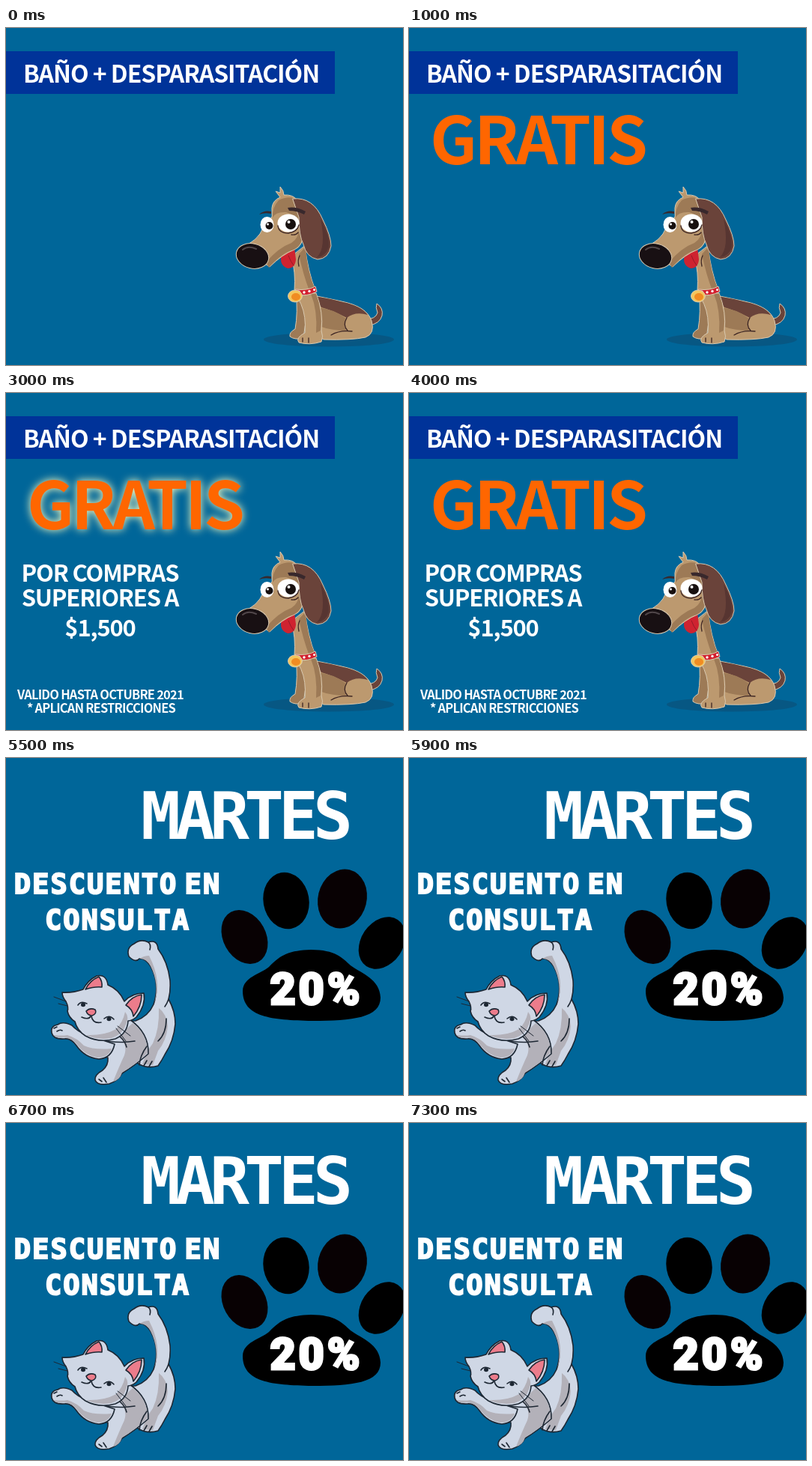
An HTML page that plays this animation: 530 px wide and 450 px high, repeating every 8300 ms.

```html
<!DOCTYPE html>
<html lang="es">
<head>
<meta charset="utf-8">
<title>Promociones para mascotas</title>
<style>
  html, body { margin: 0; width: 100%; height: 100%; overflow: hidden; background: #006699; }
  svg { display: block; width: 530px; height: 450px; }
  text { text-anchor: middle; fill: #fff; }
  .round { font-family: "Noto Sans CJK JP", "Noto Sans CJK SC", "Noto Sans CJK", sans-serif; font-weight: 700; }
  .block { font-family: "DejaVu Sans Mono", monospace; font-weight: 700; }
  .title { font-size: 32px; letter-spacing: -1.05px; }
  .free { font-size: 88px; letter-spacing: -4px; fill: #ff6600; }
  .terms { font-size: 31px; letter-spacing: -1.2px; }
  .small { font-size: 16.5px; letter-spacing: -.8px; }
  .day { font-size: 88px; letter-spacing: -7px; }
  .offer { font-size: 37px; letter-spacing: 2px; word-spacing: -15px; stroke: #fff; stroke-width: 2; }
  .percent { font: 900 59px Roboto, sans-serif; letter-spacing: 4px; stroke: #fff; stroke-width: 3; }

  /* every change is a hard cut */
  .bath, .visit, .free, .terms, .small, .offer { animation: 8300ms step-end infinite; }
  .bath { animation-name: bath; }
  .visit { animation-name: visit; }
  .free { animation-name: free; }
  .terms { animation-name: terms; }
  .small { animation-name: small; }
  .offer { animation-name: blink; }
  @keyframes bath { 0% { opacity: 1 } 66.265%, 100% { opacity: 0 } }
  @keyframes visit { 0% { opacity: 0 } 66.265%, 100% { opacity: 1 } }
  @keyframes free {
    0% { opacity: 0; text-shadow: none }
    12.048% { opacity: 1; text-shadow: none }
    36.145% { opacity: 1; text-shadow: 0 0 12px #ffffbe }
    48.193%, 100% { opacity: 1; text-shadow: none }
  }
  @keyframes terms { 0% { opacity: 0 } 24.096%, 100% { opacity: 1 } }
  @keyframes small { 0% { opacity: 0 } 36.145%, 100% { opacity: 1 } }
  @keyframes blink {
    0%, 71.084%, 75.904%, 80.723%, 87.952%, 100% { opacity: 1 }
    68.675%, 73.494%, 78.313%, 85.542% { opacity: 0 }
  }

  .dog { stroke-linejoin: round; stroke-linecap: round; }
  .tan { fill: #bc996f; }
  .shade { fill: #9d7a56; }
  .brown { fill: #6a433a; }
  .edge { stroke: #d9c9b0; stroke-width: 1; }
  .line { fill: none; stroke: #3b2423; stroke-width: 1.3; }
  .cat { stroke: #1d2733; stroke-width: 1.6; stroke-linejoin: round; stroke-linecap: round; }
  .fur { fill: #cfd7e5; }
  .dim { fill: #b3b1b9; stroke: none; }
  .pink { fill: #ec7c8b; }
  .ink { fill: none; }
</style>
</head>
<body>
<svg viewBox="0 0 530 450">
  <g class="bath">
    <path fill="#003399" d="M0 31H439V88H0Z"/>
    <text class="round title" x="220.5" y="73">BAÑO + DESPARASITACIÓN</text>
    <text class="round free" x="171.5" y="182">GRATIS</text>
    <g class="round terms">
      <text x="125.5" y="252">POR COMPRAS</text>
      <text x="125.5" y="285">SUPERIORES A</text>
      <text x="125.5" y="325">$1,500</text>
    </g>
    <g class="round small">
      <text x="126" y="409">VALIDO HASTA OCTUBRE 2021</text>
      <text x="127" y="427">* APLICAN RESTRICCIONES</text>
    </g>

    <g class="dog">
      <ellipse cx="431" cy="416" rx="87" ry="9.5" fill="#075783"/>
      <!-- tail and body -->
      <path class="brown edge" d="M479 389Q494 389 496 380Q493 373 495 368Q504 374 502 384Q499 395 485 397Z"/>
      <path class="tan edge" d="M410 357Q425 360 448 365Q482 372 488 391Q493 408 480 413Q462 417 424 416L408 408Z"/>
      <path class="brown" d="M412 358Q431 361 450 366Q474 371 483 383Q466 378 455 387Q436 377 421 373Z"/>
      <path class="shade" d="M415 373Q438 375 454 388Q450 398 454 404Q434 404 418 398Z"/>
      <path class="line" stroke-width=".8" d="M455 387Q449 397 456 404M434 410Q445 403 462 405"/>
      <!-- legs -->
      <path class="shade edge" d="M387 352Q390 380 386 402Q378 406 379 412Q386 417 397 414L403 372Z"/>
      <path class="tan edge" d="M386 352L414 354Q424 380 421 404Q424 412 421 419Q405 424 391 420Q386 414 399 407Q401 385 394 369Z"/>
      <path class="shade" d="M407 355L414 355Q423 380 420 404L414 407Q416 377 407 355Z"/>
      <path class="line" stroke-width=".8" d="M396 414V419M404 414V420"/>
      <!-- neck -->
      <path class="tan edge" d="M381 305Q387 326 385 351L413 350Q403 325 399 291Z"/>
      <path class="shade" d="M391 302L400 292Q402 325 413 350L405 351Q396 327 391 302Z"/>
      <path class="line" stroke-width=".8" d="M392 304Q389 310 391 318"/>
      <!-- collar and tag -->
      <path d="M387 349Q402 351 413 345L415 352Q402 359 387 356Z" fill="#d3202e" class="edge"/>
      <g fill="#fff"><circle cx="391" cy="352" r="1.6"/><circle cx="398" cy="353" r="1.7"/><circle cx="405" cy="351.5" r="1.7"/><circle cx="411.5" cy="349.5" r="1.5"/></g>
      <ellipse cx="386" cy="358" rx="9.5" ry="8" fill="#f3c65e" class="edge"/>
      <ellipse cx="387" cy="359" rx="6" ry="5" fill="#f08c22"/>
      <!-- tongue -->
      <path d="M368 302Q364 317 376 321Q386 321 387 309L385 293Z" fill="#cf2330"/>
      <path d="M377 304Q380 312 384 317" fill="none" stroke="#941b28"/>
      <!-- head -->
      <path class="tan edge" d="M355 240Q356 230 366 226L360 218L366 220V212Q371 217 371 223Q383 222 389 230Q397 248 397 273Q397 291 385 296Q369 302 352 319L314 293Q337 284 343 267Q350 260 355 252Z"/>
      <path class="shade" d="M364 230Q380 222 389 231Q397 251 397 272Q396 290 384 296Q368 300 351 320L347 313Q364 293 381 287Q392 280 391 266Q389 250 374 246Q360 245 356 253Q355 240 364 230Z"/>
      <path class="brown edge" d="M383 228Q410 225 423 256Q434 278 434 291Q431 308 416 309Q401 306 397 289Q391 277 391 253Z"/>
      <path d="M420 255Q433 279 431 293Q427 305 415 306Q428 294 420 255Z" fill="#573531"/>
      <!-- face -->
      <ellipse cx="348.5" cy="262.5" rx="9" ry="10.5" fill="#fff"/>
      <ellipse cx="377" cy="260.5" rx="14.5" ry="12" fill="#fff"/>
      <path class="line" d="M363 264Q364 274 377 274Q389 272 391 263"/>
      <circle cx="351.5" cy="264" r="5" fill="#17100f"/><circle cx="380" cy="262" r="7" fill="#17100f"/>
      <circle cx="349.5" cy="262" r="1.5" fill="#fff"/><circle cx="377.5" cy="259" r="2" fill="#fff"/>
      <path d="M338 249Q344 243 354 245L354 248Q345 246 338 249ZM376 240Q387 238 400 245L398 249Q388 244 378 244Z" fill="#38282c"/>
      <path class="line" d="M381 276Q387 277 390 273"/>
      <ellipse cx="329" cy="304.5" rx="22" ry="16.5" transform="rotate(14 329 304.5)" fill="#181013" class="edge"/>
      <path d="M316 296Q323 290 334 295" fill="none" stroke="#51474a" stroke-width="2"/>
    </g>
  </g>

  <g class="visit">
    <text class="block day" x="318" y="108">MARTES</text>
    <g class="block offer">
      <text x="149" y="181">DESCUENTO EN</text>
      <text x="149" y="229">CONSULTA</text>
    </g>

    <g fill="#080103">
      <ellipse cx="318.5" cy="239" rx="28.5" ry="38" transform="rotate(-29 318.5 239)"/>
      <ellipse cx="374" cy="190.5" rx="30.5" ry="38" transform="rotate(-10 374 190.5)" fill="#000"/>
      <ellipse cx="449" cy="188" rx="32.5" ry="40" transform="rotate(14 449 188)"/>
      <ellipse cx="502" cy="247" rx="28" ry="37.5" transform="rotate(34 502 247)" fill="#000"/>
      <path fill="#000" d="M407 256C440 256 449 267 460 277C475 288 499 295 500 320C500 347 462 351 409 351C354 350 316 346 316 311C317 292 339 289 351 279C367 262 379 257 407 256Z"/>
    </g>
    <text class="percent" x="414.5" y="329">20%</text>

    <g class="cat">
      <!-- tail, back and hind leg -->
      <path class="fur" d="M164 265Q160 253 171 248Q180 241 190 246Q202 242 203 255Q216 272 219 297Q220 311 217 322Q226 338 226 355Q224 378 212 396Q208 404 203 411Q189 415 178 409L150 387L139 352L173 351Q190 345 197 329Q206 302 193 278Q186 267 178 268Q173 274 164 265Z"/>
      <path class="dim" d="M204 334Q214 341 216 358Q214 378 203 391L196 410L182 409Q187 393 196 381Q205 362 204 334Z"/>
      <path class="dim" d="M191 264Q184 264 178 268Q187 267 193 278Q205 302 198 327Q209 299 191 264Z"/>
      <path class="ink" d="M190 246Q194 249 192 256M217 322Q215 328 212 332M214 348Q214 368 203 378M184 411L188 404M191 412L195 405"/>
      <!-- chest and legs -->
      <path class="fur" d="M108 374Q112 398 136 400Q137 410 129 417Q118 423 119 430Q122 438 138 435Q150 431 155 421Q173 410 190 395Q191 367 165 349Z"/>
      <path class="dim" d="M150 372Q163 382 158 397Q151 412 143 432Q152 430 155 420Q173 409 189 394Q189 368 169 354Z"/>
      <path class="ink" d="M118 375Q148 382 172 378M152 372Q159 378 161 386M124 429L128 432M130 427L134 433"/>
      <path class="ink" d="M178 410Q179 397 188 385"/>
      <!-- raised paw -->
      <path class="fur" d="M88 357Q76 351 69 356Q59 358 61 367Q63 376 78 375Q87 374 94 384Q105 400 124 402Q141 401 145 382L108 370Q95 365 88 357Z"/>
      <path class="dim" d="M64 370Q74 371 82 370Q95 374 104 384Q117 390 141 388Q137 400 122 400Q105 397 95 383Q87 373 77 373Q66 375 64 370Z"/>
      <path class="ink" d="M68 365Q72 362 75 364M64 361L68 359"/>
      <!-- head -->
      <path class="fur" d="M75 313Q89 314 103 309Q109 297 121 291Q134 288 136 303Q151 309 158 325Q168 314 184 314Q187 330 174 346Q168 351 163 351Q162 368 146 375Q124 381 106 371Q95 364 92 352Q84 347 82 338Q84 333 80 325Q75 319 75 313Z"/>
      <path class="pink" d="M106 309Q112 297 124 292Q129 298 128 306Q118 305 106 309ZM160 330Q168 318 181 316Q181 332 170 345Q169 335 160 330Z"/>
      <path class="dim" d="M159 339Q165 346 160 356Q156 369 141 374Q122 377 107 370Q131 371 147 362Q156 353 159 339Z"/>
      <path class="pink" d="M107 338Q112 333 119 336Q122 341 115 344Q109 344 107 338Z"/>
      <path class="ink" d="M113 345Q110 350 101 346M114 345Q116 355 127 353M96 330Q100 324 108 328M131 348Q138 342 144 349"/>
      <g fill="#1d2733" stroke="none"><ellipse cx="103" cy="329.5" rx="3" ry="2.7"/><ellipse cx="137.500" cy="348.500" rx="3" ry="2.700"/></g>
      <path class="ink" stroke-width="1" d="M80 325L64 319M82 331L70 328M147 361L160 378M149 358L166 371"/>
    </g>
  </g>
</svg>
</body>
</html>
```
